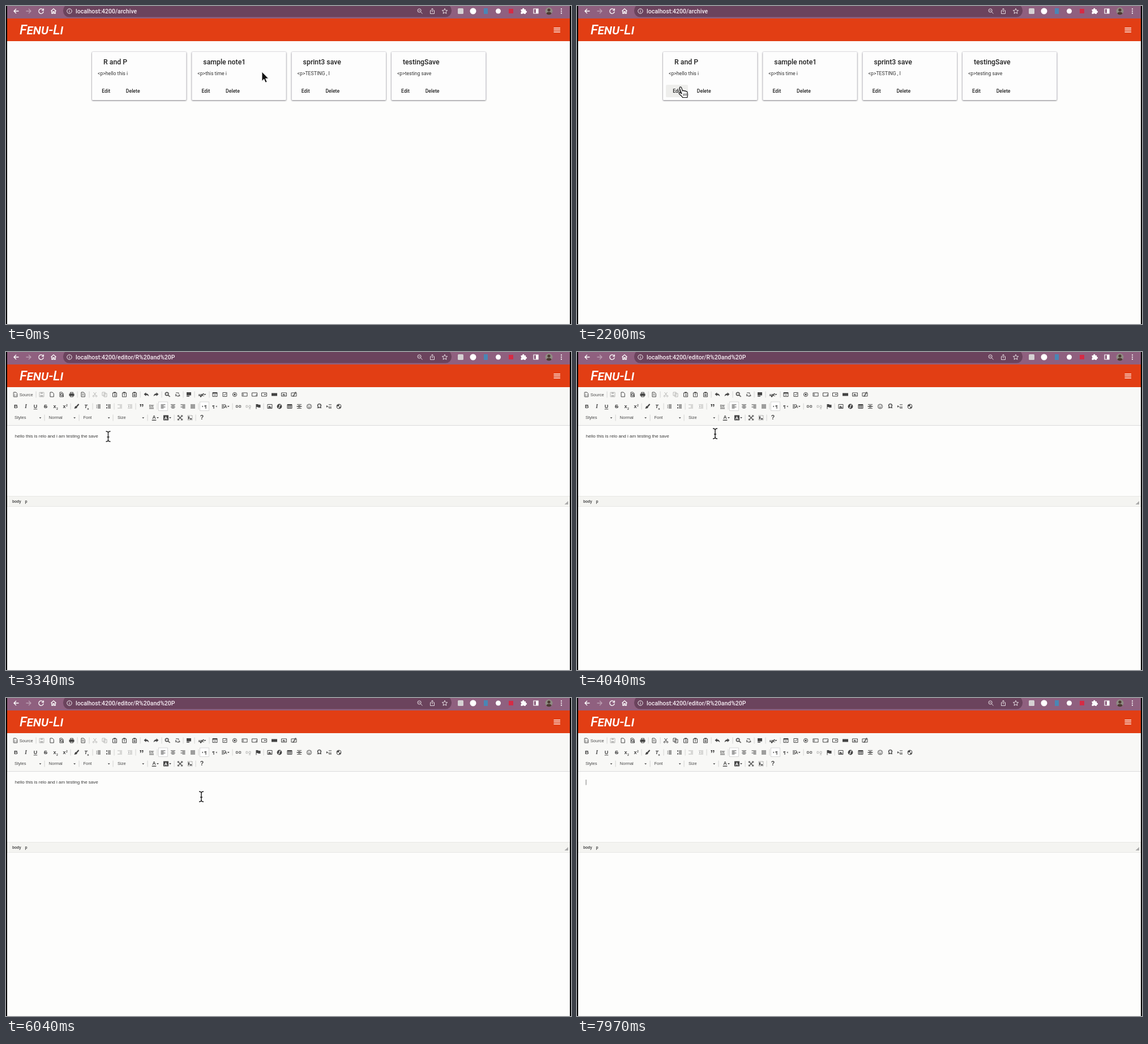
An HTML page that plays this animation: 998x561 px, repeating every 8 s.

```html
<!DOCTYPE html>
<html lang="en">
<head>
<meta charset="utf-8">
<title>Notes</title>
<style>
html, body { margin: 0; width: 100%; height: 100%; overflow: hidden; background: #000; }
svg { display: block; width: 100%; height: 100%; }
text { font-family: Roboto, sans-serif; fill: #222; white-space: pre; }
.ui text { font-family: "Liberation Sans", Arial, sans-serif; font-size: 7.5px; fill: #484848; }
.ui .note { font-size: 8.06px; fill: #3a3a3a; }
.ui .path { font-size: 6.6px; font-weight: 700; }
.ui .glyph { font-weight: 700; text-anchor: middle; fill: #404040; }
.url { font-size: 10.5px; font-weight: 500; fill: #f6edf3; }
.brand { font: italic 500 24px Roboto, sans-serif; font-variant: small-caps; fill: #fff; }
.title { font-size: 12.3px; font-weight: 500; }
.body { font-size: 8.7px; fill: #333; }
.button { font-size: 8.7px; font-weight: 500; }
.card { fill: #fdfdfd; filter: drop-shadow(0 1.2px .8px rgba(0,0,0,.4)) drop-shadow(0 0 .8px rgba(40,30,80,.3)); }
.line { fill: none; stroke: #444; }
.fill { fill: #444; }
.off { opacity: .35; }

.archive, .editor, .hover, .arrow, .hand, .beam, .live, .clip, .idle, .ready, .written, .selection, .caret {
  animation: 8s step-end infinite;
}
.archive { animation-name: archive; }
.editor { animation-name: editor; }
.hover, .hand { animation-name: hand; }
.arrow { animation-name: arrow; }
.beam { animation-name: beam; }
.live { animation-name: live; }
.clip { animation-name: clip; }
.idle { animation-name: idle; }
.ready { animation-name: ready; }
.written { animation-name: written; }
.selection { animation-name: selection; }
.caret { animation-name: caret; }
.pointer { animation: move 8s ease-in-out infinite; }

@keyframes archive { 0% { opacity: 1 } 32.25%, 100% { opacity: 0 } }
@keyframes editor { 0% { opacity: 0 } 32.25%, 100% { opacity: 1 } }
@keyframes arrow { 0% { opacity: 1 } 9.5%, 100% { opacity: 0 } }
@keyframes hand { 0% { opacity: 0 } 9.5% { opacity: 1 } 32.25%, 100% { opacity: 0 } }
@keyframes beam { 0% { opacity: 0 } 32.25% { opacity: 1 } 98%, 100% { opacity: 0 } }
@keyframes live { 0% { opacity: .42 } 36.9%, 100% { opacity: 1 } }
@keyframes clip { 0% { opacity: .35 } 96.5%, 100% { opacity: 1 } }
@keyframes idle { 0% { opacity: 1 } 36.9%, 100% { opacity: 0 } }
@keyframes ready { 0% { opacity: 0 } 36.9%, 100% { opacity: 1 } }
@keyframes written { 0% { opacity: 0 } 36.9% { opacity: 1 } 98%, 100% { opacity: 0 } }
@keyframes selection { 0% { opacity: 0 } 95.8% { opacity: 1 } 98%, 100% { opacity: 0 } }
@keyframes caret { 0% { opacity: 0 } 98%, 100% { opacity: 1 } }
@keyframes move {
  0%, 1.9% { transform: translate(452px, 117px) }
  10.6%, 32.2% { transform: translate(184px, 144px) }
  32.25%, 44.5% { transform: translate(180.5px, 149px) }
  50.5%, 53% { transform: translate(244px, 144px) }
  60%, 100% { transform: translate(345px, 174px) }
}
</style>
</head>
<body>
<svg id="stage" viewBox="0 0 998 561"></svg>
<script>
const at = (x, y, body, cls = '') => `<g class="${cls}" transform="translate(${x} ${y})">${body}</g>`;
const rect = (x, y, w, h, fill, more = '') =>
  `<rect x="${x}" y="${y}" width="${w}" height="${h}" fill="${fill}" ${more}/>`;
const circle = (x, y, r, fill) => `<circle cx="${x}" cy="${y}" r="${r}" fill="${fill}"/>`;
const text = (x, y, cls, value) => `<text x="${x}" y="${y}" class="${cls}">${value.replace(/</g, '&lt;')}</text>`;
const line = (d, more = '') => `<path class="line" d="${d}" ${more}/>`;
const fill = d => `<path class="fill" d="${d}"/>`;
const glyph = (value, size = 9.5, more = '', x = 0) =>
  `<text class="glyph" x="${x}" y="3.4" style="font-size:${size}px;${more}">${value}</text>`;
const box = (x, y, w, h) => `M${x} ${y}h${w}v${h}h${-w}z`;
const drop = (x, y) => at(x, y, fill('M-1.9-1h3.8l-1.9 2.2z'));
const bars = (left, widths) =>
  line(widths.map((w, i) => `M${left === 'mid' ? -w / 2 : left === 'end' ? 4 - w : left} ${i * 2 - 3}h${w}`).join(''));

// Browser chrome
const white = (x, d, opacity = 1, w = 1.3) =>
  at(x, 9, `<path d="${d}" fill="none" stroke="#fff" stroke-width="${w}" opacity="${opacity}"/>`);
const chrome = [
  rect(2, 0, 994, 22, '#8f607f'),
  rect(101, -3, 686, 22.5, '#6b435d', 'rx="10.5"'),
  white(18, 'M4.5 0h-8.5M0-4l-4 4 4 4'),
  white(40, 'M-4.5 0h8.5M0-4l4 4-4 4', .4),
  white(62, 'M3.3-2.5a4.2 4.2 0 1 0 .9 3.2M4.3-4.5v3.2h-3.2'),
  white(84, 'M-4.5 0L0-4.2 4.5 0M-3.2-1v5h2.2v-3h2v3h2.2v-5'),
  white(112, 'M-4.2 0a4.2 4.2 0 1 0 8.4 0a4.2 4.2 0 1 0-8.4 0M0-.6v3M0-2.5v1', .9, 1),
  white(731, 'M-4-1a3.1 3.1 0 1 0 6.2 0a3.1 3.1 0 1 0-6.2 0M1.5 1.4L4.5 4.5M-2.3-1h2.8', .8, 1),
  white(753, 'M-1.5-1h-2v5.5h7v-5.5h-2M0 2v-6.5M-2-2.7l2-2 2 2', .8, 1),
  white(775, 'M0-4.6l1.3 3.1 3.4.3-2.6 2.2.8 3.3L0 2.5l-2.9 1.8.8-3.3-2.6-2.2 3.4-.3z', .8, 1),
  rect(798, 4, 10, 10, '#d5d1d3', 'rx="1.5"'),
  circle(825, 9, 5.5, '#fff'),
  rect(844, 4, 7, 10, '#4a86b5'),
  circle(869.5, 9, 4.5, '#fff'),
  rect(888, 5, 8, 8, '#d52b45'),
  at(914, 9, '<path fill="#fff" d="M-4.5-3h2.7a1.7 1.7 0 1 1 3.2 0h2.6v2.7a1.6 1.6 0 1 1 0 3.1v2.2h-3a1.4 1.4 0 0 0-2.7 0h-2.8v-2.9a1.5 1.5 0 0 0 0-2.8z"/>'),
  white(936, box(-4, -4, 8, 8), 1, 1.2),
  rect(936, 5, 4, 8, '#fff'),
  circle(959, 9, 6.5, '#8f8b83'),
  circle(959, 7, 2.6, '#4b3931'),
  at(959, 9, '<path fill="#4b3931" d="M-4.6 4.6a4.7 4 0 0 1 9.2 0a6.5 6.5 0 0 1-9.2 0z"/>'),
  ...[5.3, 9, 12.7].map(y => circle(981, y, 1.1, '#fff'))
].join('');

const header = rect(2, 22, 994, 40, '#e23e14') + text(24, 50, 'brand', 'Fenu-Li') +
  [38.2, 41.6, 45].map(y => rect(967.5, y, 11.5, 1.4, '#fff')).join('');

// Archive page
const notes = [['R and P', '<p>hello this i'], ['sample note1', '<p>this time i'],
  ['sprint3 save', '<p>TESTING , I'], ['testingSave', '<p>testing save']];
const cards = notes.map(([title, body], i) => at(152 + i * 176.3, 81,
  '<rect class="card" width="166.5" height="85" rx="1.5"/>' +
  (i ? '' : rect(5, 58, 39, 22, '#eeeeec', 'rx="2" class="hover"')) +
  text(20, 22, 'title', title) + text(10, 40.8, 'body', body) +
  text(17.2, 71.7, 'button', 'Edit') + text(59.8, 71.7, 'button', 'Delete'))).join('');
const archive = rect(2, 62, 994, 499, '#fdfdfc') + cards + text(123, 12.6, 'url', 'localhost:4200/archive');

// Toolbar icons, centred on their own origin
const page = line('M-3-4h4l2.3 2.3v5.7h-6.3z');
const board = line(box(-3.5, -3, 7, 7)) + fill(box(-2, -4.5, 4, 2));
const list = bars(-1, [5, 5, 5, 5]);
const field = line(box(-4.5, -3, 9, 6));
const ring = r => line(`M${-r} 0a${r} ${r} 0 1 0 ${2 * r} 0a${r} ${r} 0 1 0 ${-2 * r} 0`);
const shift = dir => bars(-4, [8, 0, 0, 8]) + line('M0-1h4M0 1h4') + fill(`M${-2 - dir}-2l${dir * 2.5} 2-${dir > 0 ? 2.5 : -2.5} 2z`);
const arrowTurn = dir => at(0, 0, `<g transform="scale(${dir} 1)">` +
  fill('M-4.5-.5l3.8-3.2v2q4.5 0 5 5-1.8-2.5-5-2.3v2z') + '</g>');
const chain = line('M-1-1.7h-3v3.4h3M1-1.7h3v3.4h-3M-2 0h4');
const find = line('M-4-1a2.7 2.7 0 1 0 5.4 0a2.7 2.7 0 1 0-5.4 0M1 1l3 3', 'stroke-width="1.6"');
const frame = line(box(-4, -3.5, 8, 7));

const rows = [
  [75, [
    [16.5, page + line('M-1 0l-1 1.2 1 1.2M1 0l1 1.2-1 1.2', 'stroke-width=".7"')],
    [63, line(box(-4, -3.8, 8, 7.8)) + fill(box(-2, -4, 4, 2.8) + box(-2.5, 1, 5, 3)), 'off'],
    [81, page], [98, page + at(1, 1, `<g transform="scale(.7)">${find}</g>`)],
    [116, fill(box(-4.5, -1.5, 9, 4)) + line(box(-2.5, -3.8, 5, 2) + box(-2.5, 1.5, 5, 2.5))],
    [136, page + line('M-1.5-1h3M-1.5 1h3', 'stroke-width=".8"')],
    [157, line('M-2.5-4L2 2M2.5-4L-2 2M-3.8 2.8a1.3 1.3 0 1 0 2.6 0a1.3 1.3 0 1 0-2.6 0M1.2 2.8a1.3 1.3 0 1 0 2.6 0a1.3 1.3 0 1 0-2.6 0'), 'clip'],
    [174, line(box(-4, -4, 5, 6) + box(-1, -2, 5, 6)), 'clip'],
    [192, board + line('M-1 0h3M-1 2h3')], [209, board + glyph('T', 5)], [227, board + glyph('W', 5)],
    [248, arrowTurn(1)], [265, arrowTurn(-1)],
    [285.5, find], [303, glyph('b', 6, '', -2.5) + line('M-3-3h5v2M3 3h-4') + glyph('a', 6, '', 3)],
    [323, fill(box(-4, -4, 8, 5.5)) + line('M-4 3h5', 'stroke-width="1.5"')],
    [345, glyph('ABC', 5) + line('M-3 1l2 3 5-6', 'stroke-width="1.4"') + drop(6.5, 0), 'on'],
    [369, frame + fill(box(-4, -3.5, 8, 2)) + line('M-2 1h4')],
    [386.5, line(box(-3.5, -3.5, 7, 7) + 'M-2 0l1.5 1.5 3-3.5')],
    [404, ring(3.6) + fill(box(-1.5, -1.5, 3, 3))],
    [421.5, field + line('M-2.5-2v4')], [439, field + line('M2 2l2-2')],
    [456, field + drop(1.5, 0)], [474, fill(box(-5, -2.5, 10, 5))],
    [491, field + fill('M-3 1.5l2-3 1.5 2 1-1 1.5 2z')], [508.5, field + line('M3.5-4.5l-5 8', 'stroke-width="1.5"')]
  ], [53, 126, 147, 237, 275, 313, 333, 359]],
  [96, [
    [17.5, glyph('B')], [35, glyph('I', 9.5, 'font-style:italic;font-family:Liberation Serif,serif')],
    [52, glyph('U', 9, 'text-decoration:underline')], [70, glyph('S', 9.5, 'text-decoration:line-through')],
    [87, glyph('x', 9, '', -1) + at(3.5, 2.5, glyph('2', 5))], [104, glyph('x', 9, '', -1) + at(3.5, -3.5, glyph('2', 5))],
    [125, fill('M-4.5 4l1.5-4 2-1 2 2-1 2z') + line('M0 0l3.5-4', 'stroke-width="2.2"')],
    [142, glyph('T', 9, 'font-style:italic', -1) + at(3, 2.5, glyph('x', 6))],
    [163, list + glyph('⁝', 8, '', -3)], [181, list + fill([-3.5, 1.5].map(y => box(-4, y, 2, 2)).join(''))],
    [201, shift(-1), 'off'], [219, shift(1), 'off'],
    [239.5, at(0, 5, glyph('”', 17))], [257, at(0, -2, glyph('DIV', 4.7)) + line('M-4 2.5h8M-4 4h8', 'stroke-width=".7"')],
    [277.5, bars(-4, [8, 5, 8, 5])], [295, bars('mid', [8, 5, 8, 5])],
    [312.5, bars('end', [8, 5, 8, 5])], [330, bars(-4, [8, 8, 8, 8])],
    [350.5, glyph('¶', 8, '', 2) + fill('M-4-1.5l2 1.5-2 1.5z')], [368, glyph('¶', 8, '', -1.5) + fill('M4.5-1.5l-2 1.5 2 1.5z')],
    [386, bars(-5, [7, 4, 7, 4]) + line('M0 3l2-5 2 5') + drop(6.8, 0)],
    [410.5, chain], [428, chain + line('M1 2l3 3M4 2l-3 3'), 'off'],
    [445.5, line('M-3.5-4v8.5') + fill('M-3.5-4h3l1 1h3.5v5h-4l-1-1h-2.5z')],
    [466, frame + fill('M-3 2.5l2-4 2 2.5 1-1 1 2.5z')],
    [483, `<circle class="fill" r="4.4"/><path fill="none" stroke="#f5f5f4" stroke-width="1.3" d="M-2 2.5q2 0 2-2.5t2-2.5"/>`],
    [501, frame + line('M-4-1h8M-4 1.2h8M-1.3-3v6M1.3-3v6', 'stroke-width=".8"') + fill(box(-4, -4, 8, 2))],
    [518, line('M-4-3.5h8M-4 3.5h8M-2-1.5h4M-2 1.8h4', 'stroke-width=".9"') + fill(box(-4.5, -.7, 9, 1.4))],
    [535.5, ring(4) + line('M-2 1q2 2 4 0M-1.5-1.8v1.3M1.5-1.8v1.3')],
    [553.5, glyph('Ω', 10.5)], [571, bars('end', [5, 0, 6, 0]) + line('M-1 3h5') + fill('M-5-2l3 2-3 2z')],
    [588, ring(4) + fill('M-3-2l3-1.5 1 2-2 1.5-2 0zM0 1l2.5-1 .5 2-2 1.5z')]
  ], [114, 153, 191, 229, 267, 340, 400, 455]],
  [116, [
    [261.5, at(0, -1, glyph('A', 8.5)) + fill(box(-3.8, 3.6, 7.6, 1.4)) + drop(6.5, 0), 'on'],
    [282.5, fill(box(-4.5, -4.5, 9, 9)) + at(0, -.3, glyph('A', 8, 'fill:#fff')) + drop(7.5, 0), 'on'],
    [307.5, line('M-3.5-3.5l7 7M3.5-3.5l-7 7', 'stroke-width="1.2"') +
      fill('M-4.4-4.4h3.2l-3.2 3.2zM4.4-4.4v3.2l-3.2-3.2zM-4.4 4.4v-3.2l3.2 3.2zM4.4 4.4h-3.2l3.2-3.2z')],
    [325, line(box(-4, -4, 8, 8), 'stroke-dasharray="1 1" stroke-width=".8"') + fill(box(-3, -2.5, 2, 5) + box(0, 1, 3, 2))],
    [346, glyph('?', 10.5)]
  ], [68, 129, 189, 250, 297, 335]]
];
const toolbar = rows.map(([y, icons, gaps]) =>
  gaps.map(x => rect(x - .3, y - 5.5, .7, 11, '#c4c4c4')).join('') +
  icons.map(([x, body, cls = 'live']) => at(x, y, body, cls)).join('')).join('');
const pressed = [277.5, 350.5].map(x =>
  rect(x - 8, 88, 16, 15.5, '#fff', 'stroke="#c8c8c8" stroke-width=".7"')).join('');
const combos = ['Styles', '', 'Font', 'Size'].map((name, i) =>
  text(15 + i * 60.7, 118.4, '', name) + drop(60.5 + i * 60.6, 116.2)).join('');

const editor = rect(2, 62, 994, 499, '#fdfdfc') + rect(2, 62, 994, 67, '#f8f8f6') +
  rect(2, 129, 994, .8, '#d4d4d4') + rect(2, 254, 994, 19, '#f4f4f1') +
  rect(2, 254, 994, .6, '#e2e2de') + rect(2, 272.4, 994, .6, '#e2e2de') +
  `<path fill="#aaa" d="M993 263v6h-6.5z"/>` +
  text(123, 12.6, 'url', 'localhost:4200/editor/R%20and%20P') +
  at(0, 0, `<g class="ready">${pressed}</g>` + toolbar + combos + text(23.8, 77.8, '', 'Source') +
    text(75.6, 118.4, 'idle', 'Format') + text(75.6, 118.4, 'ready', 'Normal') +
    text(11, 266.2, 'path ready', 'body') + text(33.5, 266.2, 'path ready', 'p') +
    rect(15.5, 143.5, 149.5, 10, '#b4d5fe', 'class="selection"') +
    text(15.7, 151.2, 'note written', 'hello this is relo and i am testing the save') +
    rect(15.6, 144, .8, 9.5, '#555', 'class="caret"'), 'ui');

// Pointer shapes
const beam = 'M-4-9q4 0 4 3v12q0 3-4 3M4-9q-4 0-4 3M4 9q-4 0-4-3M-2 1h4';
const pointer = `<g class="pointer">
  <path class="arrow" d="M0-1v16.5l3.7-3.5 2.6 6.1 2.8-1.2-2.6-5.9h5.2z" fill="#111" stroke="#fff" stroke-width=".9"/>
  <g class="hand" stroke="#111" stroke-width="1.2" stroke-linejoin="round">
    <path fill="#fff" d="M-2.8 1c-.6-2.4 2.7-3 3.4-.8l1.9 5.8c.6-1.4 2.5-1.2 3 .2.8-1 2.4-.7 2.8.6 1.2-.6 2.4.2 2.6 1.5l.6 3.7c.2 2-.8 3-.7 5.5h-8.2c-1-2.6-4-4-6-6.4-1.2-1.5.5-3 2.1-1.9l2.2 1.6z"/>
    <path fill="none" d="M4 10.5l.6 4M6.6 10.3l.4 4M9.2 10.2l.2 4" stroke-width=".9"/>
  </g>
  <g class="beam" fill="none"><path d="${beam}" stroke="#fff" stroke-width="3"/><path d="${beam}" stroke="#222" stroke-width="1.5"/></g>
</g>`;

document.getElementById('stage').innerHTML = rect(0, 0, 998, 561, '#000') + chrome + header +
  `<g class="archive">${archive}</g><g class="editor">${editor}</g>` + pointer;
</script>
</body>
</html>
```
